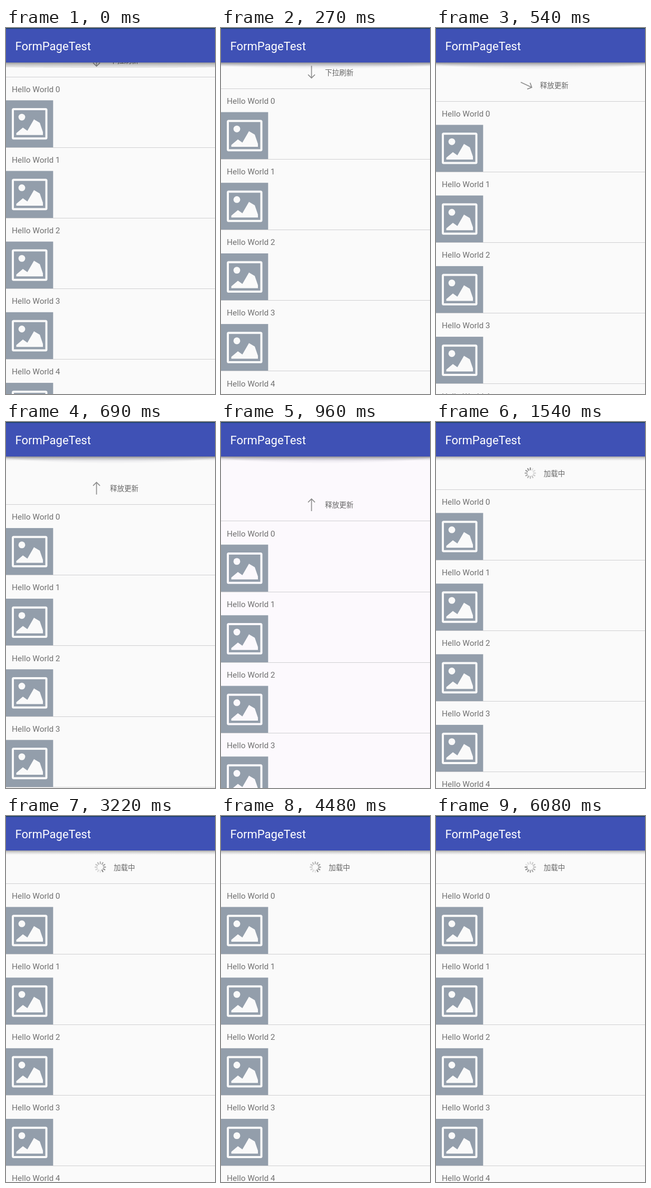
An HTML page with a canvas for the animation above (6180 ms loop, 396 by 690 pixels).

```html
<!DOCTYPE html>
<html lang="zh">
<head>
<meta charset="utf-8">
<title>Pull to refresh</title>
<style>
  html, body { margin: 0; width: 100%; height: 100%; overflow: hidden; background: #fafafa; }
  canvas { display: block; width: 396px; height: 690px; }
</style>
</head>
<body>
<canvas id="stage" width="396" height="690"></canvas>
<script>
const ctx = document.getElementById('stage').getContext('2d');
const W = 396, H = 690, LOOP = 6180;
const BAR = 65, ROW = 133.15, REST = 127.2;
const TURN = 475, RELEASE = 1385;
const LATIN = 'Roboto, sans-serif';
const CJK = '"Noto Sans CJK SC", "Noto Sans CJK", sans-serif';

// The picture is held between ticks: [first, last, intervals].
const ticks = [
  [0, 120, 1], [260, 540, 2], [690, 960, 2], [1080, 1230, 1], [1385, 1540, 1],
  [1680, 2220, 4], [2340, 3220, 6], [3370, 3520, 1], [3657, 4480, 6],
  [4630, 5650, 8], [5810, 6080, 2]
].flatMap(([a, b, n]) => Array.from({ length: n + 1 }, (_, i) => a + (b - a) * i / n));

const pull = [[0, 92.05], [540, 138.3], [960, 186.9], [1080, 193], [1230, 196]];

const clamp = v => Math.max(0, Math.min(1, v));

function listTop(t) {
  if (t >= RELEASE) return REST;
  for (let i = 1; i < pull.length; i++) {
    const [t0, y0] = pull[i - 1], [t1, y1] = pull[i];
    if (t <= t1) return y0 + (y1 - y0) * (t - t0) / (t1 - t0);
  }
  return pull[pull.length - 1][1];
}

function rect(color, x, y, w, h) {
  ctx.fillStyle = color;
  ctx.fillRect(x, y, w, h);
}

function label(text, x, y, size, color, family) {
  ctx.font = `${size}px ${family}`;
  ctx.fillStyle = color;
  ctx.fillText(text, x, y);
}

function picture(y, paper) {
  ctx.save();
  ctx.translate(0, y);
  rect('#939eab', 0, 0, 89.3, 88.7);
  ctx.strokeStyle = ctx.fillStyle = paper;
  ctx.lineWidth = 4;
  ctx.beginPath();
  ctx.roundRect(13, 16.7, 63.5, 55.3, 1.5);
  ctx.stroke();
  ctx.beginPath();
  ctx.arc(30, 31.7, 6.4, 0, Math.PI * 2);
  ctx.fill();
  ctx.beginPath();
  [[19.5, 62], [32, 51.5], [40.5, 57.5], [53, 36], [64, 42.5], [70, 60], [70, 65.5], [19.5, 65.5]]
    .forEach(([x, v]) => ctx.lineTo(x, v));
  ctx.closePath();
  ctx.fill();
  ctx.restore();
}

function arrow(y, angle) {
  ctx.save();
  ctx.translate(171.5, y);
  ctx.rotate(angle);
  ctx.strokeStyle = '#8e8e8e';
  ctx.lineWidth = 1.7;
  ctx.beginPath();
  ctx.moveTo(-12, 0);
  ctx.lineTo(10.5, 0);
  ctx.moveTo(4.5, -6.5);
  ctx.lineTo(11, 0);
  ctx.lineTo(4.5, 6.5);
  ctx.stroke();
  ctx.restore();
}

function spinner(y, t) {
  const head = Math.round((t - 1540) / 100);
  ctx.save();
  ctx.translate(178.7, y);
  ctx.lineWidth = 2.2;
  ctx.lineCap = 'round';
  for (let i = 0; i < 12; i++) {
    const age = (((head - i) % 12) + 12) % 12;
    const grey = 138 + age * 8;
    const a = i * Math.PI / 6 - Math.PI / 2;
    ctx.strokeStyle = `rgb(${grey},${grey},${grey})`;
    ctx.beginPath();
    ctx.moveTo(Math.cos(a) * 6.3, Math.sin(a) * 6.3);
    ctx.lineTo(Math.cos(a) * 9.8, Math.sin(a) * 9.8);
    ctx.stroke();
  }
  ctx.restore();
}

function header(top, t) {
  const mid = top - 31, base = top - 25.6;
  if (t >= RELEASE) {
    spinner(mid + 0.2, t);
    label('加载中', 204, base, 13.5, '#666', CJK);
    return;
  }
  arrow(mid, Math.PI / 2 - Math.PI * clamp((t - TURN) / 180));
  label(t < TURN ? '下拉刷新' : '释放更新', 197, base, 13.5, '#666', CJK);
}

// Nested arcs give the overscroll glow a soft lower edge.
function glow(t) {
  if (t >= RELEASE) return;
  const bend = clamp(t / 400);
  ctx.fillStyle = `rgba(20,15,50,${0.014 + 0.008 * bend})`;
  for (let i = 1; i <= 6; i++) {
    const depth = 9 + bend * (i * 2.2 - 9);
    const corner = depth * (1 - 0.7 * bend);
    ctx.beginPath();
    ctx.moveTo(0, BAR);
    ctx.lineTo(0, BAR + corner);
    ctx.bezierCurveTo(W * 0.2, BAR + depth * 1.15, W * 0.8, BAR + depth * 1.15, W, BAR + corner);
    ctx.lineTo(W, BAR);
    ctx.fill();
  }
}

function toolbar() {
  const shade = ctx.createLinearGradient(0, BAR, 0, BAR + 8);
  shade.addColorStop(0, 'rgba(0,0,0,.34)');
  shade.addColorStop(0.4, 'rgba(0,0,0,.15)');
  shade.addColorStop(1, 'rgba(0,0,0,0)');
  rect(shade, 0, BAR, W, 8);
  rect('#3f51b5', 0, 0, W, BAR);
  rect('#1b405e', 0, 0, W, 1.5);
  label('FormPageTest', 17.6, 42.4, 22, '#fff', LATIN);
}

function draw(t) {
  const top = listTop(t);
  const paper = top > 170 ? '#fcf9fd' : '#fafafa';
  rect(paper, 0, 0, W, H);
  header(top, t);
  for (let i = 0; i < 5; i++) {
    const y = top + i * ROW;
    label(`Hello World ${i}`, 11, y + 28.6, 15.4, '#717171', LATIN);
    picture(y + 44.3, paper);
  }
  for (let i = 0; i < 5; i++) rect('#cfcfd1', 0, Math.floor(top + i * ROW), W, 1);
  glow(t);
  toolbar();
}

const start = performance.now();

function frame() {
  const t = (performance.now() - start) % LOOP;
  draw(ticks.findLast(tick => tick <= t));
  requestAnimationFrame(frame);
}

frame();
</script>
</body>
</html>
```
